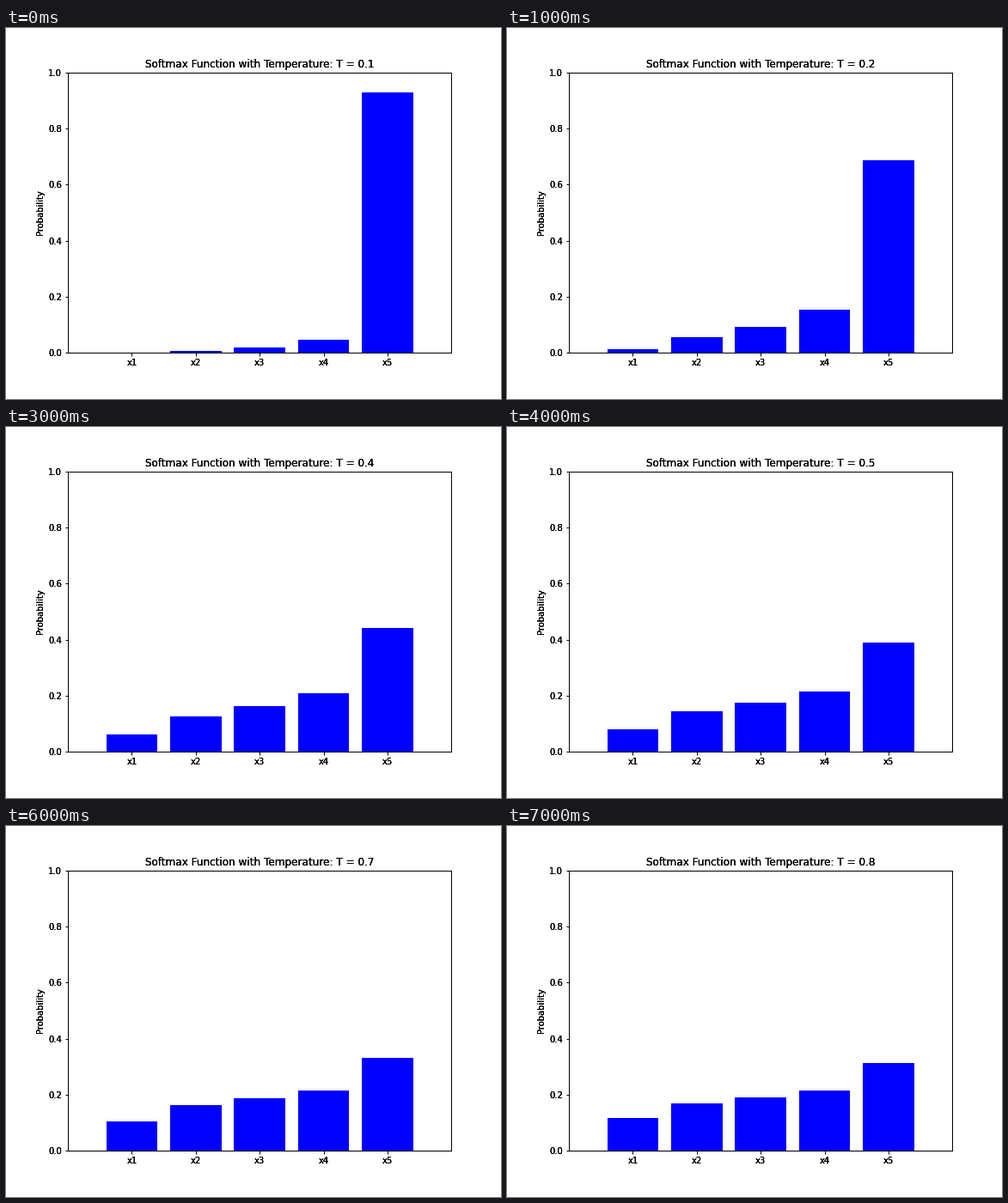
Write a matplotlib script that moves like this. It is 576x432 px and loops after 8 s.

```python
import numpy as np
import matplotlib.pyplot as plt
from matplotlib.animation import FuncAnimation

SCORES = np.array([0.1, 0.4, 0.5, 0.6, 0.9])
FRAMES = 8
TEXT_PASSES = 3

plt.rcParams["font.family"] = "DejaVu Sans"


def softmax(scores, temperature):
    weights = np.exp((scores - scores.max()) / temperature)
    return weights / weights.sum()


def thicken(text):
    """Paint the text several times so its soft edges turn dark."""
    paint = text.draw

    def draw(renderer):
        for _ in range(TEXT_PASSES):
            paint(renderer)

    text.draw = draw


fig, ax = plt.subplots(figsize=(8, 6), dpi=72, facecolor="white")
fig.subplots_adjust(left=0.125, right=0.9, bottom=0.125, top=0.88)

positions = np.arange(1, len(SCORES) + 1)
bars = ax.bar(positions, softmax(SCORES, 0.1), width=0.8, color="blue")
ax.set_xlim(0, 6)
ax.set_ylim(0, 1)
ax.set_xticks(positions, [f"x{i}" for i in positions])
ax.set_yticks(np.linspace(0, 1, 6))
ax.set_ylabel("Probability")
title = ax.set_title("")

ax.tick_params(width=1)
for spine in ax.spines.values():
    spine.set_linewidth(1)
for text in [title, ax.yaxis.label, *ax.get_xticklabels(), *ax.get_yticklabels()]:
    thicken(text)


def update(frame):
    temperature = (frame + 1) / 10
    for bar, height in zip(bars, softmax(SCORES, temperature)):
        bar.set_height(height)
    title.set_text(f"Softmax Function with Temperature: T = {temperature:.1f}")
    return [*bars, title]


anim = FuncAnimation(fig, update, frames=FRAMES, interval=1000,
                     init_func=lambda: update(0), repeat=True, repeat_delay=0)
plt.show()
```
